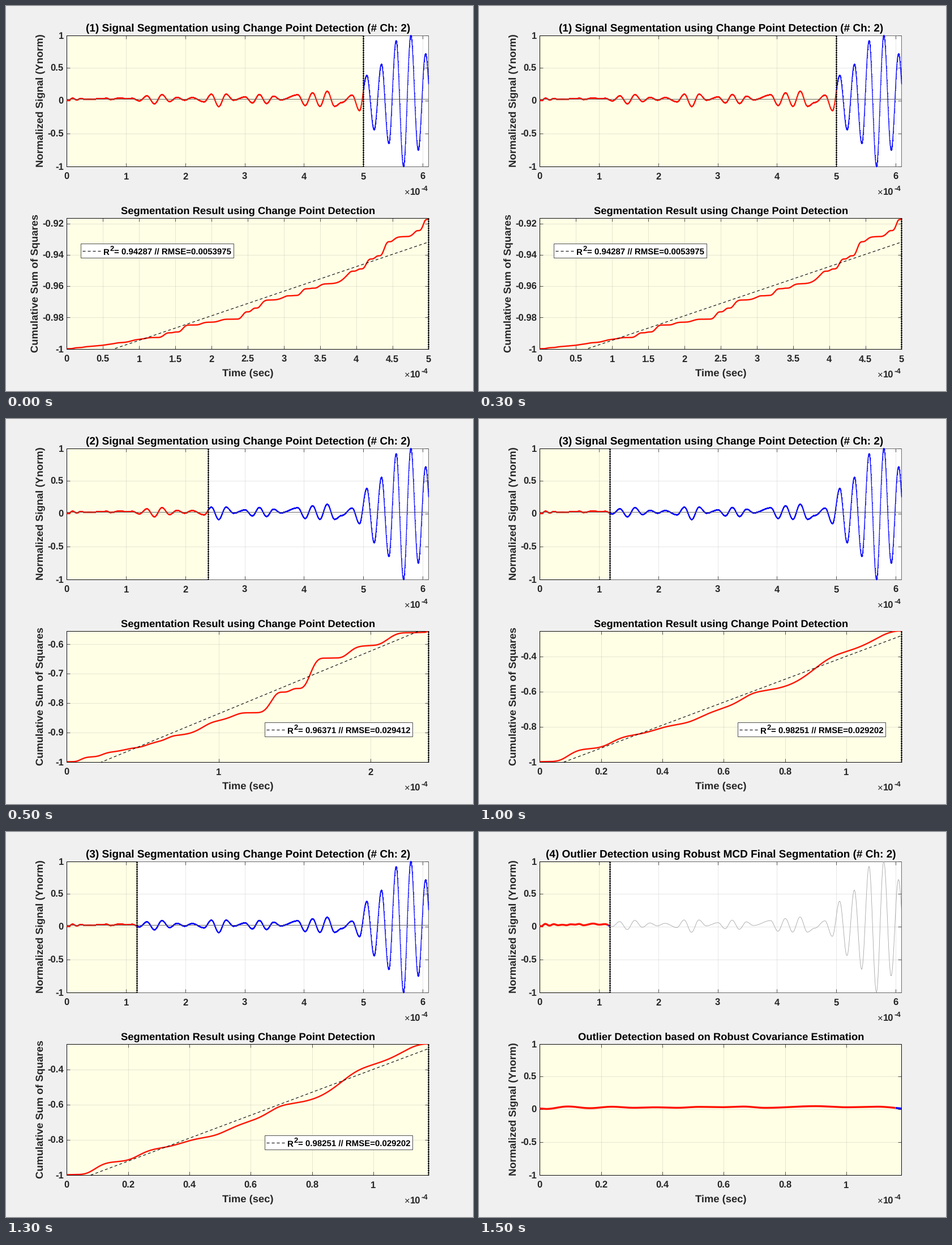
Animation, 825 px wide and 679 px high, one loop 2 s. Source, as a matplotlib script:

```python
import numpy as np
import matplotlib.pyplot as plt
from matplotlib.animation import FuncAnimation
from matplotlib.patches import Rectangle

W, H, DPI = 825, 679, 64
PT = 72 / DPI                      # points per pixel
LEFT, RIGHT = 107, 746
TOP_BOX, LOW_BOX = (51, 282), (373, 604)
T_END = 6.1                        # length of the signal, 1e-4 s
INK, RED, BLUE, PALE = "#262626", "#ff1200", "#0000ff", "#ffffe6"
GRID = (0.15, 0.15, 0.15, 0.11)

plt.rcParams.update({
    "font.family": "Liberation Sans",
    "font.weight": "bold",
    "text.hinting": "none",
    "lines.scale_dashes": False,
})

# Evenly spaced swings: start, spacing, heights in percent
BURSTS = [
    (0.02, 0.0715, [0.5, 4.3, 1.7, 3.9, 2.3, 3, 2.3, 3.7, 3.2, 4.2, 2.2]),
    (0.90, 0.1, [4.8, 3.1, 4]),
    (1.22, 0.127, [0.2, 7.9, -4.3, 9.7, -0.9, 5.6, 1.3, 5.2]),
    (2.31, 0.124, [-1.3, 10.4, -8.5, 10.4, 1.3]),
    (3.005, 0.1195, [6.2, -3, 10, -3.9, 7.4, 1.8]),
    (3.892, 0.124, [9.4, -6.9, 12.6, -8.2, 14.9, -8.2, -2.2]),
    (4.808, 0.124, [9, -14.7, 39, -44, 56, -65, 92, -100, 100, -75, 72, -55]),
]

# Each step cuts at split; gain is the rise of the normalised sum up to there
STEPS = [
    dict(split=5.0, gain=0.0837, x_step=0.5, y_step=0.02, label_x=55.5,
         key=(132, 418, 270), stats="= 0.94287 // RMSE=0.0053975"),
    dict(split=2.38, gain=0.446, x_step=1, y_step=0.1, label_x=65,
         key=(457, 534, 260.5), stats="= 0.96371 // RMSE=0.029412"),
    dict(split=1.18, gain=0.746, x_step=0.2, y_step=0.2, label_x=65,
         key=(457, 534, 260.5), stats="= 0.98251 // RMSE=0.029202"),
]


def swing(t):
    """Signal value: cosine easing from one turning point to the next."""
    knots = [(0, 1.2)] + [(start + k * gap, v) for start, gap, heights in BURSTS
                          for k, v in enumerate(heights)]
    kt, kv = np.array(knots).T
    pos = np.interp(t, kt, np.arange(len(kt)))
    i = np.minimum(pos.astype(int), len(kt) - 2)
    ease = (1 - np.cos(np.pi * (pos - i))) / 2
    return (kv[i] + (kv[i + 1] - kv[i]) * ease) / 100


time = np.arange(0, T_END, 0.001)
signal = swing(time)

fig = plt.figure(figsize=(W / DPI, H / DPI), dpi=DPI, facecolor="#f0f0f0")
ax = fig.add_axes([0, 0, 1, 1])


def to_x(t, span):
    return LEFT + (RIGHT - LEFT) * t / span


def to_y(v, box, low=-1, high=1):
    return box[1] - (box[1] - box[0]) * (v - low) / (high - low)


def line(x, y, color, width, z=3, dash=None, box=None):
    style = (0, [v * PT for v in dash]) if dash else "-"
    art, = ax.plot(x, y, color=color, lw=width * PT, ls=style, zorder=z,
                   dash_capstyle="butt", solid_capstyle="butt")
    if box:
        art.set_clip_path(Rectangle((LEFT, box[0]), RIGHT - LEFT,
                                    box[1] - box[0], transform=ax.transData))


def rect(x, y, w, h, face, edge, width=0.9, z=0.5):
    ax.add_patch(Rectangle((x, y), w, h, fc=face, ec=edge, lw=width * PT,
                           zorder=z))


def text(x, y, s, size, color="black", ha="left", **kw):
    ax.text(x, y, s, fontsize=size * PT, color=color, ha=ha, va="baseline",
            zorder=7, **kw)


def dotted_curve(x, y, color):
    line(x, y, color, 1)
    ax.scatter(x, y, s=(1.5 * PT) ** 2, c=color, lw=0, zorder=3)


def change_line(x, box):
    line([x, x], box, "black", 2.5, z=4, dash=(2.4, 1.7))


def panel(box, title, size, y_label, label_x, x_ticks, y_ticks, shade_to):
    """Axes box with grid and labels; ticks are (pixel, value) pairs."""
    top, low = box
    rect(LEFT, top, RIGHT - LEFT, low - top, "white", "none", z=0.2)
    rect(LEFT, top, shade_to - LEFT, low - top, PALE, "none")
    for x, v in x_ticks:
        line([x, x], box, GRID, 1, z=1)
        for end, step in ((top, 6), (low, -6)):
            line([x, x], [end, end + step], INK, 0.8, z=2)
        text(x, low + 23, f"{v:g}", 16.67, INK, "center")
    for y, v in y_ticks:
        line([LEFT, RIGHT], [y, y], GRID, 1, z=1)
        for end, step in ((LEFT, 6), (RIGHT, -6)):
            line([end, end + step], [y, y], INK, 0.8, z=2)
        text(101.5, y + 6, f"{v:g}", 16.67, INK, "right")
    rect(LEFT, top, RIGHT - LEFT, low - top, "none", "#4c4c4c", 0.8, z=2)
    rect(LEFT, top, shade_to - LEFT, low - top, "none", "black", 0.9, z=2.1)

    text(427, top - 7, title, size, ha="center")
    text(label_x, (top + low) / 2, y_label, 18.4, INK, "center",
         rotation=90, rotation_mode="anchor")
    text(703.5, low + 51.5, "×", 16.67, INK, weight="normal")
    text(714, low + 51.5, "10", 16.67, INK)
    text(733, low + 43.5, "-4", 13.3, INK)


def x_pairs(step, span):
    return [(to_x(v, span), v) for v in np.arange(0, span + 1e-6, step)]


def y_pairs(step, box, high=1):
    values = np.round(np.arange(-1, high + 1e-6, step), 4)
    return [(to_y(v, box, high=high), v) for v in values]


def top_panel(title, split):
    cut = to_x(split, T_END)
    panel(TOP_BOX, title + " (# Ch: 2)", 18.95, "Normalized Signal (Ynorm)",
          65, x_pairs(1, T_END), y_pairs(0.5, TOP_BOX), cut)
    change_line(cut, TOP_BOX)


def low_panel(title, *args):
    panel(LOW_BOX, title, 18.4, *args, RIGHT)
    text(427, 651.5, "Time (sec)", 18.4, INK, "center")


def legend(x, y, w, stats):
    rect(x, y, w, 25, "white", INK, 0.8, z=5)
    line([x + 3, x + 37], [y + 13, y + 13], "black", 1.1, z=6, dash=(5, 4))
    text(x + 40, y + 20, "R", 15)
    text(x + 51, y + 13, "2", 13)
    text(x + 59, y + 20, stats, 15)


def draw_step(n, split, gain, x_step, y_step, label_x, key, stats):
    top_panel(f"({n}) Signal Segmentation using Change Point Detection", split)
    x, y = to_x(time, T_END), to_y(signal, TOP_BOX)
    past = time < split
    dotted_curve(x[past], y[past], RED)
    dotted_curve(x[~past], y[~past], BLUE)
    line([LEFT, RIGHT], [163, 163], "#555555", 0.9, z=3.2)

    high = gain - 1
    low_panel("Segmentation Result using Change Point Detection",
              "Cumulative Sum of Squares", label_x, x_pairs(x_step, split),
              y_pairs(y_step, LOW_BOX, high))
    t = time[past]
    total = np.cumsum(signal[past] ** 2)
    total = gain * total / total[-1] - 1
    fit = np.polyval(np.polyfit(t, total, 1), t)
    x = to_x(t, split)
    line(x, to_y(total, LOW_BOX, high=high), RED, 2.4, box=LOW_BOX)
    line(x, to_y(fit, LOW_BOX, high=high), "black", 1.1, z=3.5, dash=(5, 4),
         box=LOW_BOX)
    change_line(RIGHT, LOW_BOX)
    legend(*key, stats)


def draw_outliers(split=1.18, cut=1.16):
    top_panel("(4) Outlier Detection using Robust MCD Final Segmentation", split)
    line(to_x(time, T_END), to_y(signal, TOP_BOX), "#a0a0a0", 0.8, z=2.5,
         box=TOP_BOX)
    low_panel("Outlier Detection based on Robust Covariance Estimation",
              "Normalized Signal (Ynorm)", 65, x_pairs(0.2, split),
              y_pairs(0.5, LOW_BOX))
    outlier = (time >= cut) & (time <= split)
    for part, color in ((time < cut, RED), (outlier, BLUE)):
        for box, span in ((TOP_BOX, T_END), (LOW_BOX, split)):
            line(to_x(time[part], span), to_y(signal[part], box), color, 3.4)


def draw(i):
    ax.clear()
    ax.set_axis_off()
    if i < len(STEPS):
        draw_step(i + 1, **STEPS[i])
    else:
        draw_outliers()
    # Whole numbers fall just short of pixel centres, so lines snap onto them
    ax.set_xlim(-0.45, W - 0.45)
    ax.set_ylim(H - 0.55, -0.55)
    return []


anim = FuncAnimation(fig, draw, frames=4, interval=500, repeat=True,
                     repeat_delay=0, init_func=lambda: [], blit=False)
plt.show()
```
